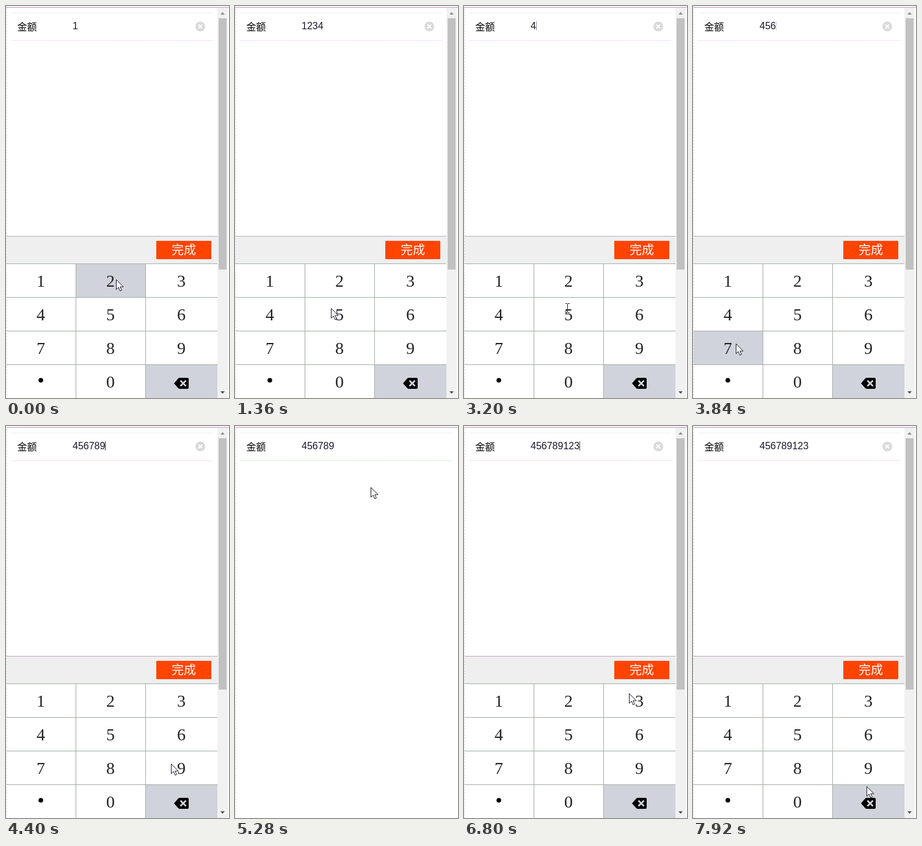
An HTML page for the animation above (8 s loop, 365 by 641 pixels).

```html
<!DOCTYPE html>
<html lang="zh-CN">
<head>
<meta charset="utf-8">
<title>Keypad</title>
<style>
  html, body { margin: 0; width: 100%; height: 100%; overflow: hidden; background: #fff; }
  svg { display: block; }
  .crisp { shape-rendering: crispEdges; }
  .label { font: 16px "Noto Sans CJK SC", "Noto Sans CJK", sans-serif; }
  .value { font: 16px "Liberation Sans", Arial, sans-serif; fill: #18182c; }
  .done { font: 300 20px "Noto Sans CJK SC", "Noto Sans CJK", sans-serif; fill: #fff; text-anchor: middle; }
  .digit { font: 28px "Liberation Serif", "Times New Roman", serif; fill: #222; text-anchor: middle; }
</style>
</head>
<body>
<svg width="365" height="641" viewBox="0 0 365 641">
  <rect width="365" height="641" fill="#fff"/>
  <g class="crisp" fill="none">
    <path d="M0 2.5H365" stroke="#cfa9cd"/>
    <path d="M0 1.5H365" stroke="#f3e6f3"/>
    <path d="M.5 4V641" stroke="#d9d9d9" stroke-dasharray="3 2"/>
    <path id="rowTop" stroke="#e6d6e6" stroke-dasharray="1 1"/>
    <path id="rowBottom" stroke-dasharray="2 1"/>
  </g>
  <text class="label" x="18.5" y="40">金额</text>
  <text class="value" id="value" x="109" y="38"></text>
  <rect class="crisp" id="caret" y="25" width="1" height="15" fill="#333"/>

  <g id="panel">
    <circle cx="318" cy="33.5" r="8" fill="#dadada"/>
    <path d="M315 30.5l6 6m0-6l-6 6" stroke="#fff" stroke-width="2"/>
    <g class="crisp">
      <rect x="346" y="3" width="17" height="638" fill="#f1f1f1"/>
      <rect x="348" y="20" width="13" height="411" fill="#c1c1c1"/>
      <rect x="1" y="377" width="345" height="44" fill="#efefef"/>
      <path d="M1 376.5H346" stroke="#bda9bd"/>
    </g>
    <path d="M351 14l3.5-4 3.5 4z" fill="#8c8c8c"/>
    <path d="M351 630l3.5 4 3.5-4z" fill="#505050"/>
    <rect x="246" y="384" width="90" height="30" rx="1" fill="#ff4400"/>
    <text class="done" x="291" y="406">完成</text>
    <g id="keys"></g>
    <path class="crisp" d="M1 421.5H346M1 476.5H346M1 531.5H346M1 586.5H346M114.5 421V641M228.5 421V641" stroke="#a3ada3"/>
    <path d="M275 617l7-8q1-1 2.500-1H297q2 0 2 2v14q0 2-2 2H284.500q-1.500 0-2.500-1z"/>
    <path d="M285.500 612.500l9 9m0-9l-9 9" stroke="#d3d6dd" stroke-width="2.600"/>
  </g>

  <path id="arrow" d="M.5 .5V16.500L4.200 13l2.600 6 2.600-1.200-2.600-5.600H12z" fill="#fff" stroke="#1b1b30"/>
  <path id="beam" class="crisp" d="M-3 -7.500H0M1 -7.500H4M.5 -7V7M-3 7.500H0M1 7.500H4" fill="none" stroke="#222"/>
</svg>
<script>
const LOOP = 8000, STEP = 80, PRESS = 80, BLINK = 800;
const CLOSE = 4960, OPEN = 5600;
const KEYS = "123456789.0<", CLEAR = "C", GREY = "#d0d3db";
const NS = "http://www.w3.org/2000/svg";
const $ = id => document.getElementById(id);
const show = (el, on) => el.setAttribute("visibility", on ? "visible" : "hidden");

// Keypad
const keyRects = {}, centres = [];
[...KEYS].forEach((key, i) => {
  const col = i % 3, left = 1 + col * 114, top = 422 + Math.floor(i / 3) * 55;
  const width = col === 2 ? 117 : 113, cx = Math.round(left + width / 2 - 0.6);
  const add = (name, attrs) => {
    const el = document.createElementNS(NS, name);
    for (const a in attrs) el.setAttribute(a, attrs[a]);
    return $("keys").appendChild(el);
  };
  const rect = add("rect", { x: left, y: top, width, height: 54, fill: key === "<" ? GREY : "#fff", class: "crisp" });
  if (key === "<") return;
  keyRects[key] = rect;
  if (key === ".") add("circle", { cx, cy: 612, r: 3.8 });
  else {
    add("text", { x: cx, y: top + 36.5, class: "digit" }).textContent = key;
    centres.push([cx, top + 28]);
  }
});

// The pointer rests briefly at each stop and eases from one to the next.
const stops = [], entries = [];
const stop = (t, x, y, hold = 40) => stops.push({ from: t - PRESS, to: t + hold, x, y });

function type(keys, start, gap) {
  [...keys].forEach((key, n) => {
    const t = start + n * gap, i = KEYS.indexOf(key);
    entries.push({ t, key });
    stop(t, 70 + (i % 3) * 100, 436 + Math.floor(i / 3) * 58);
  });
}

stop(80, 180, 447);
entries.push({ t: 80, key: "2" });
type("3456", 560, 480);
entries.push({ t: 2480, key: CLEAR });
stop(2480, 317, 32);
type("456789", 3010, 278);
stop(4880, 284, 397, 320);   // done button
stop(5360, 222, 100, -80);
stop(5520, 172, 34, 80);     // back into the field
type("123", 6160, 280);
stop(LOOP, 284, 589);

function pointerAt(t) {
  const i = stops.findIndex(s => t <= s.to), b = stops[i], a = stops[i - 1];
  if (!a || t >= b.from) return [b.x, b.y];
  const u = (t - a.to) / (b.from - a.to), e = u * u * (3 - 2 * u);
  return [Math.round(a.x + (b.x - a.x) * e), Math.round(a.y + (b.y - a.y) * e)];
}

function draw(t) {
  const open = t < CLOSE || t >= OPEN;
  let text = "1", last = -BLINK / 2, pressed = null;
  for (const e of entries) {
    if (e.t <= t) {
      text = e.key === CLEAR ? "" : text + e.key;
      last = e.t;
    } else if (t >= e.t - PRESS) pressed = e.key;
  }
  if (t >= OPEN) last = Math.max(last, OPEN);

  $("value").textContent = text;
  $("caret").setAttribute("x", Math.round(109 + text.length * 8.9));
  $("caret").setAttribute("opacity", open ? (1 + Math.cos((t - last) / BLINK * 2 * Math.PI)) / 2 : 0);

  const right = open ? 339 : 355;
  $("rowTop").setAttribute("d", `M9 11.5H${right}`);
  $("rowBottom").setAttribute("d", `M9 56.5H${right}`);
  $("rowBottom").setAttribute("stroke", open ? "#f4cff0" : "#bff0bd");
  show($("panel"), open);
  for (const key in keyRects) keyRects[key].setAttribute("fill", key === pressed ? GREY : "#fff");

  const [x, y] = pointerAt(t);
  const overDigit = open && centres.some(([cx, cy]) => Math.abs(x - cx) < 8 && Math.abs(y - cy) < 14);
  const overField = x > 108 && x < 306 && y > 20 && y < 48;
  const beam = overDigit || overField;
  show($("beam"), beam);
  show($("arrow"), !beam);
  $(beam ? "beam" : "arrow").setAttribute("transform", `translate(${x} ${y})`);
}

const start = performance.now();
function tick() {
  const t = (performance.now() - start) % LOOP;
  draw(Math.floor(t / STEP) * STEP);
  requestAnimationFrame(tick);
}
tick();
</script>
</body>
</html>
```
